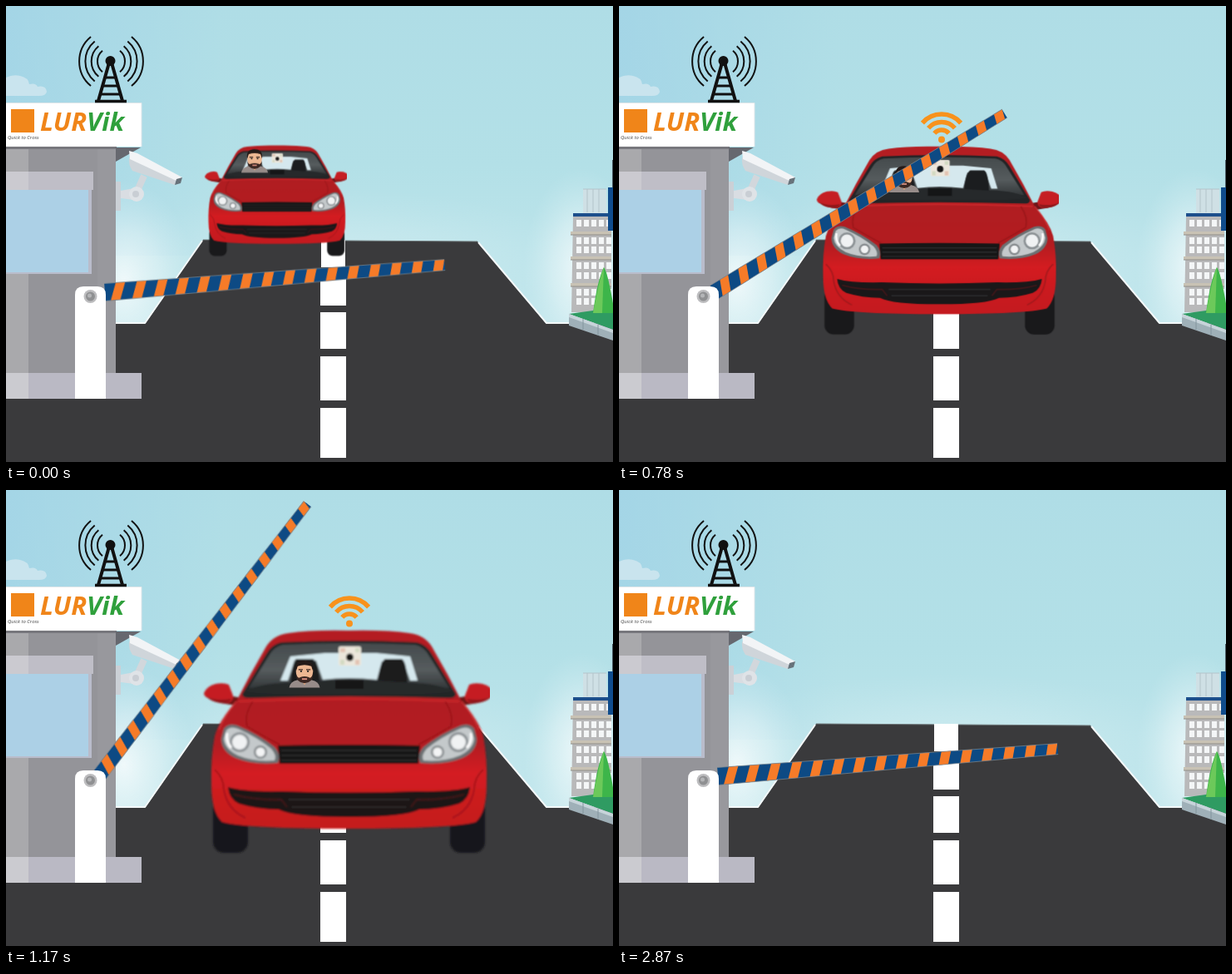
Animation of 730 by 548 pixels, one loop 3.49 s. Source, as an HTML page:

```html
<!DOCTYPE html>
<html lang="en">
<head>
<meta charset="utf-8">
<title>Toll gate</title>
<style>
html, body { margin: 0; width: 100%; height: 100%; overflow: hidden; background: #b2dfe7; }
svg { display: block; width: 730px; height: 548px; }
</style>
</head>
<body>
<svg viewBox="0 0 730 548" xmlns="http://www.w3.org/2000/svg">
  <defs>
    <linearGradient id="sky" x1="0" y1="0" x2="0" y2="1">
      <stop offset="0" stop-color="#afdde6"/><stop offset=".35" stop-color="#b3e0e7"/>
      <stop offset=".7" stop-color="#c3e7ed"/>
    </linearGradient>
    <linearGradient id="skyLeft"><stop offset="0" stop-color="#9fd2e6"/><stop offset="1" stop-color="#9fd2e6" stop-opacity="0"/></linearGradient>
    <radialGradient id="glow">
      <stop offset="0" stop-color="#fff" stop-opacity=".9"/><stop offset=".5" stop-color="#f2fafb" stop-opacity=".5"/>
      <stop offset="1" stop-color="#d8eff3" stop-opacity="0"/>
    </radialGradient>
    <linearGradient id="hood" x1="0" y1="0" x2="0" y2="1">
      <stop offset="0" stop-color="#b51d22"/><stop offset=".3" stop-color="#b01e22"/>
      <stop offset=".58" stop-color="#b31c20"/><stop offset=".72" stop-color="#d41c21"/>
      <stop offset=".85" stop-color="#cb1a1f"/><stop offset="1" stop-color="#c41a1f"/>
    </linearGradient>
    <linearGradient id="glass" x1="0" y1="0" x2="0" y2="1">
      <stop offset="0" stop-color="#454b4d"/><stop offset=".6" stop-color="#565c5e"/><stop offset="1" stop-color="#34383a"/>
    </linearGradient>
    <filter id="soft" x="-5%" y="-5%" width="110%" height="110%"><feGaussianBlur stdDeviation=".9"/></filter>
    <clipPath id="crop"><rect x="230" y="160" width="352" height="290"/></clipPath>
    <clipPath id="boom"><path d="M0-10.5L410-6.5V6.5L0 10.5Z"/></clipPath>

    <g id="side">
      <rect x="249" y="370" width="42" height="66" rx="13" fill="#19191b"/>
      <path d="M262 246L284 250L276 259L258 256Z" fill="#6d1518"/>
      <path d="M238 244Q241 236 252 233Q262 231 268 234L273 247Q274 254 267 256Q252 257 243 250Q238 248 238 244Z" fill="#c51e23"/>
      <path d="M241 248Q252 254 271 251Q269 257 258 256Q246 254 241 248Z" fill="#8f171a"/>
    </g>
    <g id="lamp">
      <path d="M262 287Q267 280 278 283Q304 294 323 309Q331 318 327 328Q298 331 276 322Q259 314 259 299Z" fill="#6c7173"/>
      <path d="M265 289Q270 283 279 287Q302 297 319 311Q326 319 323 325Q298 327 279 319Q263 311 262 299Z" fill="#c4c9cb"/>
      <circle cx="281" cy="303" r="12" fill="#8b9194"/><circle cx="281" cy="303" r="9" fill="#f0f2f3"/>
      <circle cx="306" cy="315" r="8" fill="#84898c"/><circle cx="306" cy="315" r="5.500" fill="#f3f4f5"/>
      <path d="M266 292q-2 10 5 18" fill="none" stroke="#fff" stroke-width="3"/>
    </g>
    <g id="crease" fill="none" stroke-width="2">
      <path d="M251 336Q262 346 262 360Q266 384 288 394" stroke="#a6191d"/>
      <path d="M277 254Q263 270 256 288" stroke="#dc3a3e" opacity=".6"/>
      <path d="M297 254Q286 270 290 284Q310 296 329 306" stroke="#941619" opacity=".7"/>
    </g>
  </defs>

  <rect width="730" height="548" fill="url(#sky)"/>
  <rect width="260" height="300" fill="url(#skyLeft)" opacity=".7"/>
  <ellipse cx="142" cy="330" rx="85" ry="120" fill="url(#glow)" opacity=".85"/>
  <ellipse cx="692" cy="315" rx="70" ry="120" fill="url(#glow)" opacity=".85"/>
  <ellipse cx="400" cy="300" rx="300" ry="80" fill="url(#glow)" opacity=".28"/>
  <path d="M0 86Q8 82 17 84Q27 86 28 94Q36 92 38 97Q48 95 49 103Q48 108 40 108H0Z" fill="#c9e4ee"/>

  <!-- road -->
  <path d="M132 381H168L237 281L567 283L649 381H730V548H0V440H132Z" fill="#3a3a3c"/>
  <path d="M132 381H167L236 282M568 284L650 381H680" fill="none" stroke="#f3f8f9" stroke-width="2"/>
  <path d="M237 281L567 283" stroke="#6d7678"/>
  <path d="M379 281H408V314H379ZM378 320H409V360H378ZM378 368H409V412H378ZM378 421H409V474H378ZM378 483H409V543H378Z" fill="#fff"/>

  <!-- office block -->
  <g>
    <path d="M694 220H722V249H694Z" fill="#cfe0e5"/>
    <path d="M694 220H722M699 220V248M706 220V248M713 220V248" stroke="#b3c4ca" fill="none"/>
    <path d="M682 253H728V368H680Z" fill="#b9b9ba"/>
    <g id="panes" fill="#f4f6f7"></g>
    <path d="M679 271h49v4h-49zM679 301h49v4h-49zM679 333h49v4h-49z" fill="#c8c2b4"/>
    <path d="M679 275h49M679 305h49M679 337h49" stroke="#8f8d89"/>
    <rect x="682" y="249" width="46" height="4" fill="#1d4f8c"/>
    <rect x="724" y="218" width="6" height="52" fill="#104c8c"/>
    <path d="M729.5 185V218" stroke="#4a5a63"/>
    <path d="M677 370L706 366H730V389Z" fill="#2f9b62"/>
    <path d="M719 314Q724 320 732 369H706Q711 330 719 314Z" fill="#3db54a"/>
    <path d="M719 314Q713 330 706 369H717Z" fill="#6cc95a"/>
    <path d="M677 370L730 389V402L677 384Z" fill="#9fb0b8"/>
    <path d="M677 370L730 389V393L677 374Z" fill="#c7d4da"/>
    <path d="M694 376V389M712 383V396" stroke="#82949d"/>
  </g>

  <!-- booth -->
  <rect y="168" width="132" height="304" fill="#949499"/>
  <rect y="168" width="27" height="304" fill="#a9a9ac"/>
  <rect x="110" y="170" width="22" height="272" fill="#98989d"/>
  <rect y="169" width="133" height="3" fill="#77777d"/>
  <path d="M132 170H162L132 187Z" fill="#66686f"/>
  <rect y="199" width="105" height="22" fill="#bfbec7"/>
  <rect y="199" width="27" height="22" fill="#cbcad0"/>
  <rect y="221" width="103" height="101" fill="#b9bccb"/>
  <rect y="221" width="99" height="99" fill="#acd0e6"/>
  <rect y="441" width="163" height="31" fill="#bab9c4"/>
  <rect y="441" width="27" height="31" fill="#cbcbd0"/>
  <rect y="116" width="163" height="53" fill="#fff"/>
  <path d="M0 116.5H163V169" fill="none" stroke="#dfe6e9"/>
  <rect x="6" y="124" width="28" height="28" fill="#f08519"/>
  <text x="41" y="150" font-family="'Open Sans', sans-serif" font-size="31" font-weight="700" font-style="italic"><tspan fill="#f08519">LUR</tspan><tspan fill="#2fa03c">Vik</tspan></text>
  <text x="2" y="160" font-family="'Open Sans', sans-serif" font-size="6" font-style="italic" fill="#444">Quick to Cross</text>

  <!-- mast -->
  <g stroke="#111" fill="none">
    <g id="waves" stroke-width="2"></g>
    <path d="M123.500 70L111 114M127.500 70L140 114" stroke-width="4"/>
    <path d="M120 86H131M117 96H134M114 106H137" stroke-width="3"/>
    <path d="M107 114.500H145" stroke-width="3.500"/>
    <circle cx="125.500" cy="66" r="6" fill="#111" stroke="none"/>
  </g>

  <!-- camera -->
  <path d="M132 211H138V246H132Z" fill="#cbd0d6"/>
  <path d="M138 222L154 219V233L138 231Z" fill="#d9dde2"/>
  <path d="M157 224L166 204" stroke="#d2d7dc" stroke-width="8"/>
  <circle cx="157" cy="226" r="9" fill="#dfe3e7"/><circle cx="156" cy="226" r="4" fill="#c9ced4"/>
  <path d="M148 182L205 208L203 215L152 198Q147 191 148 182Z" fill="#cfd5da"/>
  <path d="M148 174L158 177L212 206L207 211L149 184Z" fill="#f2f4f6"/>
  <path d="M205 208L212 206L210 213L203 215Z" fill="#67727a"/>

  <g id="car">
    <g clip-path="url(#crop)">
      <g filter="url(#soft)">
        <use href="#side"/><use href="#side" transform="matrix(-1 0 0 1 825 0)"/>
        <path d="M412 169Q368 168 340 172Q322 174 313 188Q293 222 276 256Q256 277 251 296Q246 322 247 354Q247 387 260 399Q290 407 412 407Q535 407 565 399Q578 387 578 354Q579 322 574 296Q569 277 549 256Q532 222 512 188Q503 174 485 172Q457 168 412 169Z" fill="url(#hood)"/>
        <path d="M331 183Q412 179 494 183Q506 186 512 197L541 245Q541 250 533 250Q412 246 292 250Q284 250 284 245L313 197Q319 186 331 183Z" fill="#222527"/>
        <path d="M333 186Q412 182 492 186Q502 188 508 198L533 238Q412 232 292 238L317 198Q323 188 333 186Z" fill="url(#glass)"/>
        <path d="M342 200L383 196H446L486 200L495 229H486L478 206H452L446 228Q412 224 381 228L373 205H347L339 229H330Z" fill="#d5e8ee"/>
        <path d="M456 203H476Q482 206 483 234H447Q449 207 456 203ZM349 203H369Q376 207 378 234H342Q344 207 349 203Z" fill="#1b1d1f"/>
        <path d="M288 241Q310 231 350 231Q412 225 475 231Q515 231 537 241Q535 247 412 245Q290 247 288 241Z" fill="#26292b"/>
        <path d="M396 228H430V239H396Z" fill="#151617"/>
        <rect x="400" y="188" width="27" height="23" rx="2" fill="#ece7dc"/>
        <path d="M402 190h6v5h-6zM420 204h5v6h-5z" fill="#e2c3b2"/>
        <path d="M420 190h5v5h-5zM402 204h5v6h-5z" fill="#d3dac2"/>
        <circle cx="413.500" cy="201" r="4.500" fill="#161616"/>
        <path d="M280 254Q412 248 545 254" fill="none" stroke="#c8272b" stroke-width="2.500"/>
        <path d="M327 307Q412 305 498 307L496 329H329Z" fill="#161616"/>
        <path d="M331 313H494M331 319H494M331 325H494" stroke="#2c2d2f" stroke-width="1.500"/>
        <path d="M267 357Q288 363 330 362Q412 365 495 362Q537 363 558 357Q557 371 545 377Q522 384 497 384Q480 393 412 393Q345 393 328 384Q303 384 280 377Q268 371 267 357Z" fill="#1a1819"/>
        <path d="M274 366Q300 373 331 372L338 381M551 366Q525 373 494 372L487 381" fill="none" stroke="#42171a" stroke-width="2"/>
        <path d="M340 372H485M344 381H481" stroke="#2a2a2c" stroke-width="2"/>
        <use href="#crease"/><use href="#crease" transform="matrix(-1 0 0 1 825 0)"/>
        <use href="#lamp"/><use href="#lamp" transform="matrix(-1 0 0 1 825 0)"/>
      </g>
    </g>
  </g>

  <g id="driver">
    <path d="M-18 16Q-17 9-8 7H8Q17 9 18 16Z" fill="#978c89"/>
    <path d="M-5 6H5L0 13Z" fill="#e0a982"/>
    <ellipse cy="-3" rx="10" ry="12" fill="#edb893"/>
    <path d="M-10 0Q-8 6-5 4Q0 2 5 4Q8 6 10 0Q10 10 0 11Q-10 10-10 0Z" fill="#3a2722"/>
    <path d="M-10-3Q-12-14-3-15.500Q12-17 10-3L8-9Q0-12-8-9Z" fill="#241a18"/>
    <path d="M-7-5H-2M2-5H7" stroke="#3a2722" stroke-width="1.400"/>
    <path d="M-5-3h2M3-3h2" stroke="#222" stroke-width="1.600"/>
    <path d="M-3 6H3" stroke="#d98f80" stroke-width="1.800"/>
  </g>

  <g id="wifi" fill="none" stroke="#f8921c" stroke-width="5.500"><circle cy="160.500" r="4" fill="#f8921c" stroke="none"/></g>

  <g id="bar">
    <path d="M0-10.500L410-6.500V6.500L0 10.500Z" fill="#0d4a84"/>
    <g id="stripes" fill="#f67b28" clip-path="url(#boom)"></g>
    <path d="M0-10.500L410-6.500M0 10.500L410 6.500" stroke="#7d8890" stroke-width=".7"/>
  </g>

  <path d="M83 472V347Q83 337 93 337H110Q120 337 120 347V472Z" fill="#fff"/>
  <circle cx="101.500" cy="349" r="8" fill="#bdbdbf"/>
  <circle cx="101.500" cy="349" r="5.500" fill="#8f9092"/>
  <circle cx="100.500" cy="348" r="2.500" fill="#b4b5b7"/>
</svg>
<script>
const STEP = 390, LOOP = 3490;
const $ = id => document.getElementById(id);

function add(parent, d) {
  const p = document.createElementNS("http://www.w3.org/2000/svg", "path");
  p.setAttribute("d", d);
  parent.appendChild(p);
}

// Arc of radius r around (x, y), centred on angle mid, half-width half.
function arc(x, y, r, mid, half) {
  const at = a => `${x + r * Math.cos(a)} ${y + r * Math.sin(a)}`;
  return `M${at(mid - half)}A${r} ${r} 0 0 1 ${at(mid + half)}`;
}

for (const r of [16.5, 23.8, 31.1, 38.4])
  for (const mid of [0, Math.PI]) add($("waves"), arc(126.5, 66.5, r, mid, 0.88));

for (const r of [11.5, 21, 30.5]) add($("wifi"), arc(0, 160.5, r, -Math.PI / 2, 0.86));

for (let i = 0; i < 16; i++) {
  const d = 10 + i * 25.8, lean = 4 - i * 0.09;
  add($("stripes"), `M${d + lean}-11h11.5L${d + 11.5 - lean} 11h-11.5Z`);
}

for (const y of [257, 278, 289, 308, 320, 340, 351])
  for (let x = 686; x < 726; x += 9) add($("panes"), `M${x} ${y}h6v8h-6z`);

// car: x, y, scale; driver: x, y, width; wifi: x; bar: x, y, angle, thickness
const low = [119, 344, -4.6, 1], high = [113, 342, -52.5, 0.84];
const poses = [
  { car: [238.5, 167, 0.497], driver: [299, 186, 32], bar: low },
  { car: [237, 168, 0.722], driver: [325.5, 202, 36], wifi: 367, bar: [117, 346, -17.2, 0.95] },
  { car: [237, 168, 0.846], driver: [343, 208, 36], wifi: 388, bar: [114.5, 344, -31.6, 0.9] },
  { car: [237, 168, 1], driver: [359, 221, 37], wifi: 413, bar: high },
  { car: [237, 168, 1.475], driver: [418.5, 243, 48], wifi: 498, bar: high },
  { bar: low }
];

function place(id, on, transform) {
  $(id).style.display = on ? "" : "none";
  if (on) $(id).setAttribute("transform", transform(on));
}

function draw(t) {
  const p = poses[Math.min(poses.length - 1, Math.floor((t % LOOP) / STEP))];
  place("car", p.car, ([x, y, s]) => `translate(${x} ${y}) scale(${s}) translate(-237 -168)`);
  place("driver", p.driver, ([x, y, w]) => `translate(${x} ${y}) scale(${w / 36})`);
  place("wifi", p.wifi, x => `translate(${x} 0)`);
  place("bar", p.bar, ([x, y, a, k]) => `translate(${x} ${y}) rotate(${a}) scale(1 ${k})`);
}

const start = performance.now();
function tick() {
  draw(performance.now() - start);
  requestAnimationFrame(tick);
}
tick();
</script>
</body>
</html>
```
